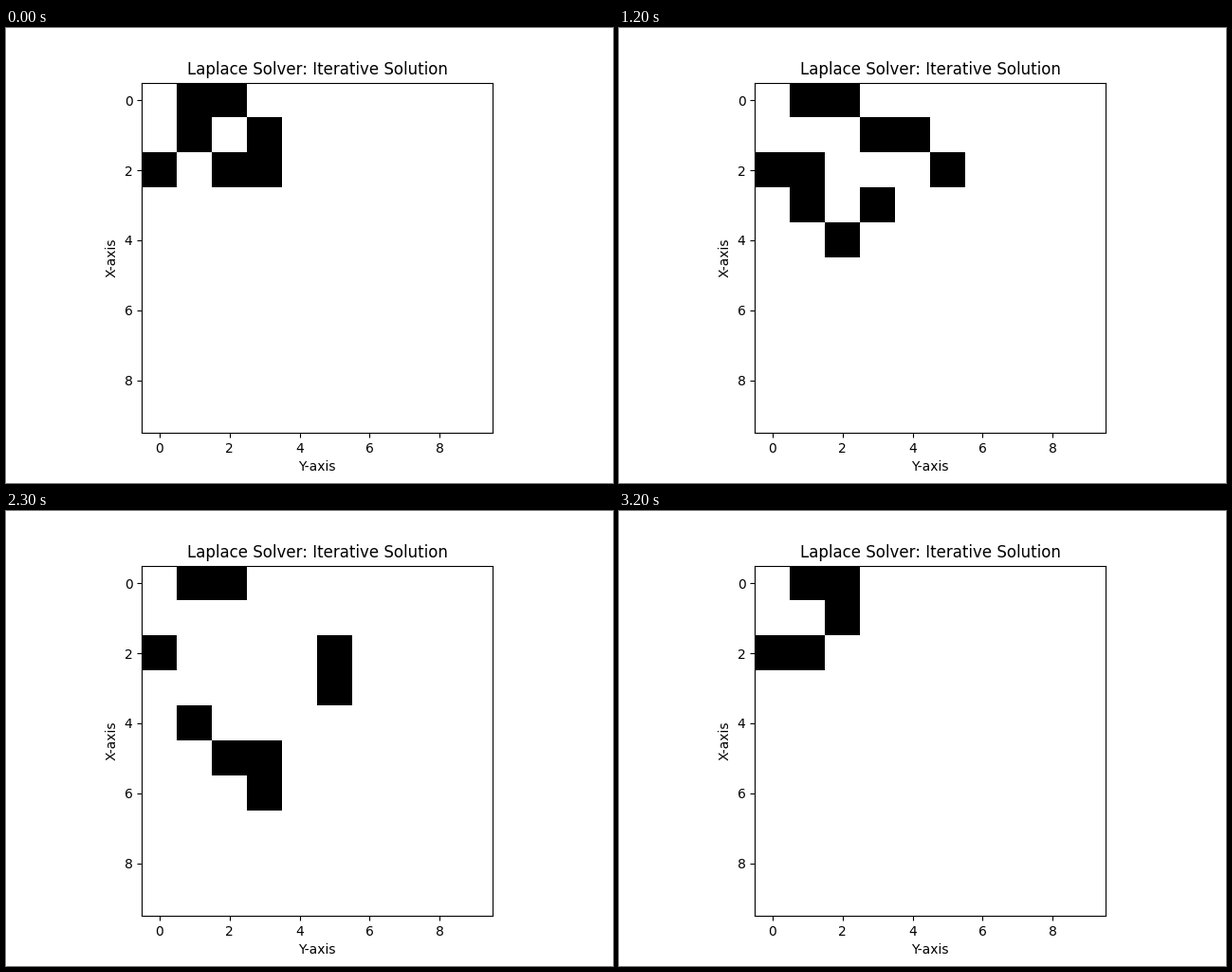
Recreate the animation shown at these times as a matplotlib script. Size 640 by 480 pixels, loop 3330 ms.

```python
import matplotlib.pyplot as plt
import numpy as np
from matplotlib.animation import FuncAnimation

SIZE = 10
STEPS = 33
STEP_MS = 100
TICK_MS = 10
LOOP_MS = 3330
LIVE = [(0, 1), (0, 2), (1, 1), (1, 3), (2, 0), (2, 2), (2, 3)]


def evolve(grid):
    """One Game of Life step; the border cells stay fixed."""
    n = SIZE - 2
    near = sum(grid[r:r + n, c:c + n]
               for r in range(3) for c in range(3) if (r, c) != (1, 1))
    new = grid.copy()
    new[1:-1, 1:-1] = (near == 3) | ((near == 2) & (grid[1:-1, 1:-1] == 1))
    return new


start = np.zeros((SIZE, SIZE), dtype=int)
start[tuple(zip(*LIVE))] = 1
states = [start]
while len(states) < STEPS:
    states.append(evolve(states[-1]))

fig, ax = plt.subplots(figsize=(6.4, 4.8), dpi=100)
image = ax.imshow(start, cmap="binary", vmin=0, vmax=1,
                  interpolation="nearest")
ax.set_title("Laplace Solver: Iterative Solution")
ax.set_xlabel("Y-axis")
ax.set_ylabel("X-axis")


def update(tick):
    # The last state holds a little longer than the others.
    step = min(tick * TICK_MS // STEP_MS, STEPS - 1)
    image.set_data(states[step])
    return [image]


anim = FuncAnimation(fig, update, frames=LOOP_MS // TICK_MS,
                     interval=TICK_MS, repeat=True, repeat_delay=0)
plt.show()
```
